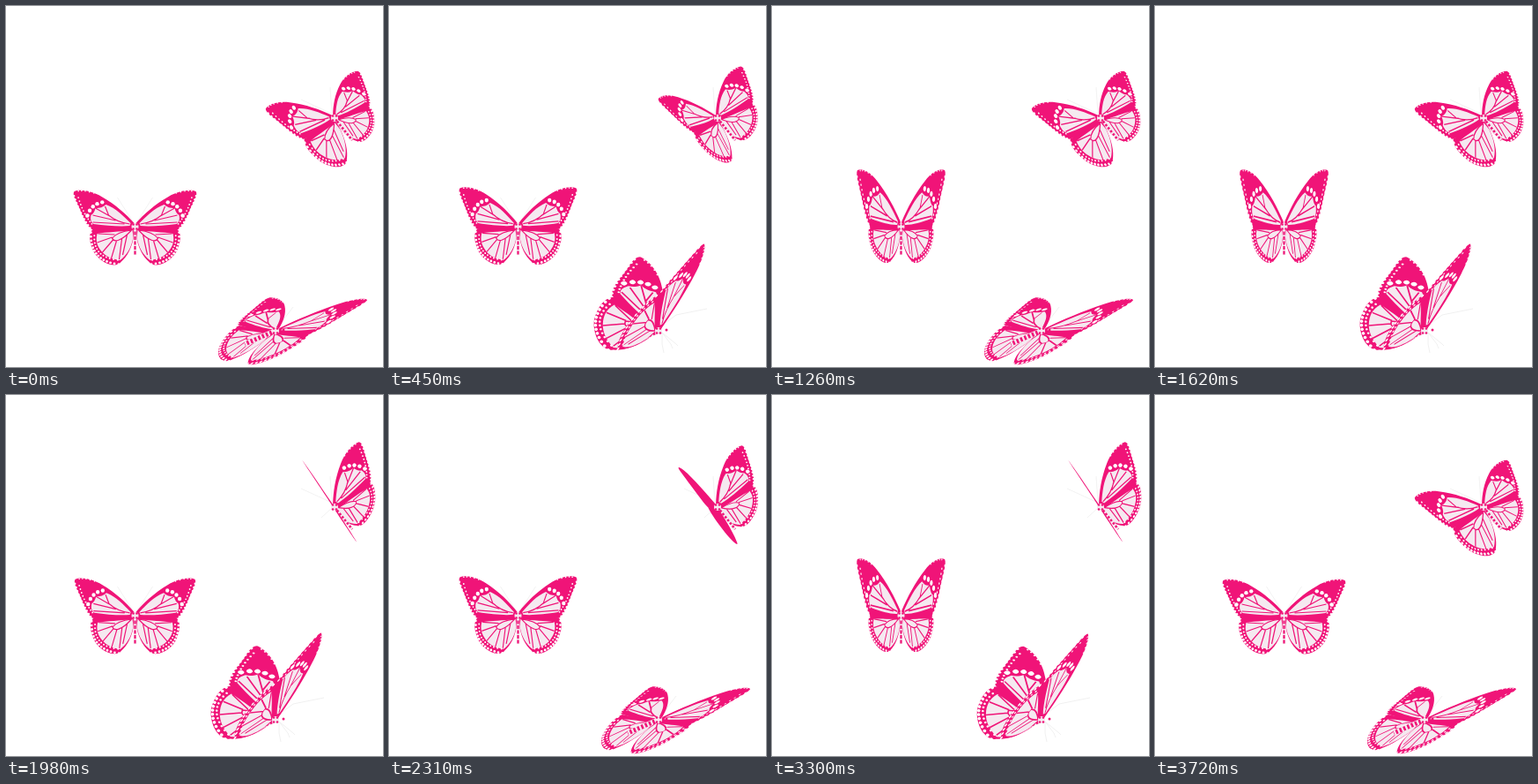
Recreate the animation shown at these times as an HTML page with a canvas. Size 428 by 409 pixels, loop 3.75 s.

```html
<!DOCTYPE html>
<html lang="en">
<head>
<meta charset="utf-8">
<title>Butterflies</title>
<style>
html, body { margin: 0; width: 100%; height: 100%; overflow: hidden; background: #fff; }
canvas { display: block; width: 428px; height: 409px; }
</style>
</head>
<body>
<canvas id="stage" width="428" height="409"></canvas>
<script>
const ctx = document.getElementById('stage').getContext('2d');
const PINK = '#f01478', PALE = '#f5e9f0', WHITE = '#fff', FAINT = '#ececec';
const LOOP = 3750, STEP = 30;

const mix = (a, b, u) => a + (b - a) * u;
const clamp = u => Math.min(1, Math.max(0, u));
const smooth = (a, b, x) => {
  const u = clamp((x - a) / (b - a));
  return u * u * (3 - 2 * u);
};
// Rises from a to b, stays up, falls from c to d.
const pulse = (x, a, b, c, d) => smooth(a, b, x) - smooth(c, d, x);

function dot(x, y, r) {
  ctx.beginPath();
  ctx.arc(x, y, r, 0, 7);
  ctx.fill();
}

// A row of n dots along a quadratic curve.
function dotRow([x0, y0], [cx, cy], [x1, y1], n, r) {
  const at = (a, c, b, u) => mix(mix(a, c, u), mix(c, b, u), u);
  for (let i = 0; i < n; i++) {
    const u = (i + .5) / n;
    dot(at(x0, cx, x1, u), at(y0, cy, y1, u), r);
  }
}

// Wing art, drawn for a right wing whose root is at 0,0.
const foreArt = {
  outline: new Path2D('M1 -4C10 -14 22 -25 38 -34C48 -40 62 -43 69 -40C72 -36 66 -28 62 -18C58 -8 54 0 49 3C34 5 14 4 1 3Z'),
  pale: new Path2D('M5 -4C13 -12 22 -21 33 -25C37 -22 39 -21 45 -21C46 -17 47 -15 50 -13C51 -8 50 -5 47 -3C32 -1 16 0 6 -1Z'),
  veins: new Path2D('M6 -3C15 -4 24 -8 30 -13L34 -23M22 -7L48 -13M27 -11L45 -21M12 -3L48 -5'),
  spots() {
    dotRow([70, -37], [63, -14], [50, 3], 11, 1.2);
    dotRow([65, -35], [59, -14], [48, -2], 10, .9);
    dotRow([34, -28], [51, -27], [55, -9], 5, 2.2);
    dotRow([44, -37], [58, -42], [66, -40], 5, .8);
  }
};
const hindArt = {
  outline: new Path2D('M1 1C16 2 34 3 48 3C53 8 52 17 48 26C45 34 36 41 28 43C22 44 18 43 16 40C9 34 3 24 1 8Z'),
  pale: new Path2D('M3 4C18 6 32 6 43 8C45 16 43 22 38 28C33 34 26 37 17 38C10 33 4 24 2 12Z'),
  veins: new Path2D('M4 4C12 5 22 8 26 13C24 18 16 17 4 4M23 9L42 8M26 12L43 18M25 15L37 29M21 16L27 36M15 14L18 37M9 9L14 32'),
  spots() {
    dotRow([50, 4], [53, 40], [16, 43], 14, 1.4);
    dotRow([46, 8], [49, 36], [17, 38], 12, 1);
  }
};

// Draws wing art with its x and y axes mapped to the vectors u and v.
function drawPart(art, u, v) {
  ctx.save();
  ctx.transform(...u, ...v, 0, 0);
  ctx.fillStyle = PINK;
  ctx.fill(art.outline);
  if (Math.abs(u[0] * v[1] - u[1] * v[0]) > .25) {
    ctx.fillStyle = PALE;
    ctx.fill(art.pale);
    ctx.strokeStyle = PINK;
    ctx.lineWidth = 1.2;
    ctx.stroke(art.veins);
    ctx.fillStyle = WHITE;
    art.spots();
  }
  ctx.restore();
}

// A wing swings its span from open to shut around fixed fore and hind axes.
function drawWing({ open, shut, fore, hind, sweep = 1 }, s) {
  const span = open.map((n, i) => mix(n, shut[i], s));
  drawPart(hindArt, span, hind);
  drawPart(foreArt, span, fore.map(n => n * mix(1, sweep, s)));
}

function line(color, width, points, dash = []) {
  ctx.strokeStyle = color;
  ctx.lineWidth = width;
  ctx.setLineDash(dash);
  ctx.beginPath();
  points.forEach(p => ctx.lineTo(...p));
  ctx.stroke();
  ctx.setLineDash([]);
}

function body(end, width, dash) {
  line(PALE, width + 1, [[0, 0], end]);
  line(PINK, width, [[0, 0], end], dash);
}

function thorax() {
  ctx.fillStyle = PALE;
  dot(0, 0, 4);
  ctx.fillStyle = PINK;
  for (const x of [-2, 2]) for (const y of [-2.5, 2.5]) dot(x, y, 1.3);
}

const front = {
  x: 146.5, y: 250, period: 1875,
  left: { open: [-1, 0], shut: [-.72, -.1], fore: [0, 1], hind: [0, 1], sweep: 1.42 },
  right: { open: [1, 0], shut: [.72, -.1], fore: [0, 1], hind: [0, 1], sweep: 1.42 },
  // A slight glide wobble, then one closing beat.
  beat: p => .15 * Math.sin(Math.PI * clamp(p / .45)) + pulse(p, .45, .51, .86, .98),
  draw(s) {
    line(FAINT, .7, [[-20, -33], [-2, -5], [0, 0], [2, -5], [20, -33]]);
    drawWing(this.left, s);
    drawWing(this.right, s);
    body([0, 32], 2.2, [4, 1.5]);
    thorax();
  }
};

const tilted = {
  x: 373, y: 127, period: 1250,
  left: { open: [-.757, .426], shut: [-.15, -.18], fore: [.65, 1], hind: [.65, 1] },
  right: { open: [.77, -.33], shut: [.79, -.63], fore: [.67, .76], hind: [.32, .78] },
  beat: p => pulse(p, .3, .48, .8, .97),
  draw(s) {
    line(FAINT, .7, [[-38, -21], [-3, -5], [-5, -35]]);
    if (s > .6) line(FAINT, .7, [[-2, 0], [-15, 12]]);
    drawWing(this.right, s);
    body([20, 25], 2.6, [2.5, 2]);
    drawWing(this.left, s);
    thorax();
  }
};

const side = {
  x: 306, y: 368, period: 1250,
  left: { open: [-.8, -.18], shut: [-1, -.85], fore: [-1.2, .63], hind: [-.9, .88] },
  right: { open: [.86, .02], shut: [.1, -.9], fore: [-1.12, .91], hind: [-1.12, .87] },
  beat: p => pulse(p, .07, .3, .63, .77),
  draw(s) {
    line(FAINT, .8, s > .4 ? [[8, -9], [20, -18], [55, -25]] : [[7, -10], [20, -27]]);
    if (s > .2) for (const x of [4, 14, 20]) line(FAINT, .8, [[4, 2], [x, 15], [x + 2, 27 - x / 2]]);
    drawWing(this.left, s);
    body([-35, 15], 5, [2.5, 2.2]);
    drawWing(this.right, s);
    thorax();
    dot(9, -1, 1.5);
  }
};

function frame(now) {
  const t = Math.floor(now % LOOP / STEP) * STEP;
  ctx.fillStyle = WHITE;
  ctx.fillRect(0, 0, 428, 409);
  for (const b of [front, tilted, side]) {
    ctx.save();
    ctx.translate(b.x, b.y);
    b.draw(b.beat(t % b.period / b.period));
    ctx.restore();
  }
}

const start = performance.now();
function tick() {
  frame(performance.now() - start);
  requestAnimationFrame(tick);
}
tick();
</script>
</body>
</html>
```
